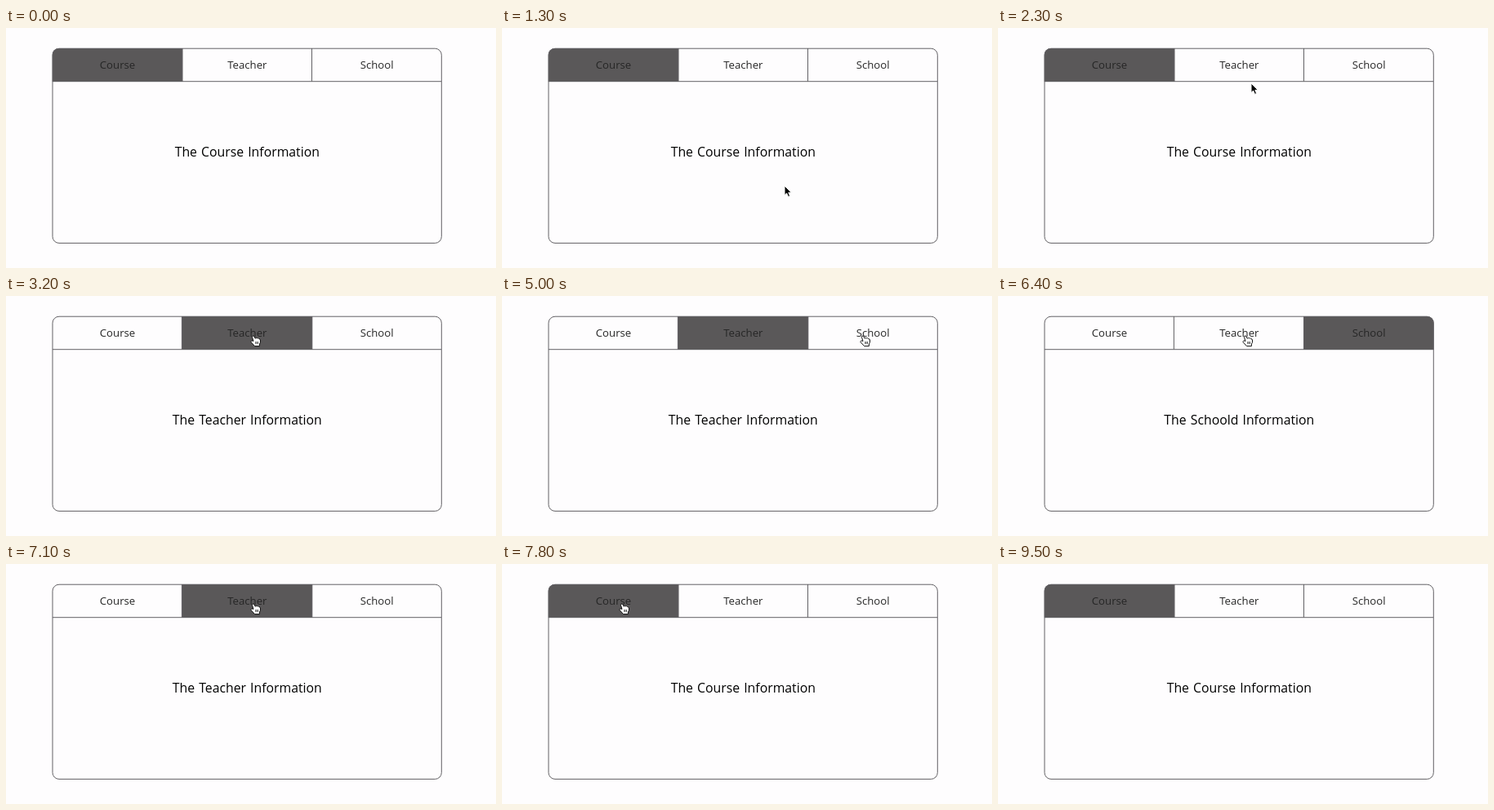
Recreate the animation shown at these times as an HTML page. Size 600x295 px, loop 10 s.

```html
<!DOCTYPE html>
<html lang="en">
<head>
<meta charset="utf-8">
<title>Tabs</title>
<style>
  html, body { margin: 0; width: 100%; height: 100%; overflow: hidden; background: #fefdfe; }
  svg { display: block; width: 600px; height: 295px; }
  text { font-family: "Open Sans", "Noto Sans", sans-serif; text-anchor: middle; }
  .tab { font-size: 13.2px; fill: #262626; }
  #info { font-size: 15.8px; word-spacing: 1px; fill: #000; }
  .line { fill: none; stroke: #626064; stroke-width: 1; }
</style>
</head>
<body>
<svg viewBox="0 0 600 295">
  <clipPath id="panel"><rect x="56.6" y="25" width="477" height="240" rx="8"/></clipPath>
  <g clip-path="url(#panel)"><rect id="active" y="25" width="160" height="41" fill="#5a5859"/></g>
  <path class="line" d="M57 65.7H533M215.4 25V65.7M374.5 25V65.7"/>
  <rect class="line" x="57" y="25.2" width="476.3" height="239.2" rx="8"/>
  <g id="labels"></g>
  <text id="info" x="295.3" y="158"></text>
  <g id="cursor" stroke-linejoin="round">
    <path id="arrow" stroke="#fff"
      d="M0 0V11.5L2.6 9.1L4.5 13.4L6.6 12.5L4.8 8.3H8.3Z"/>
    <path id="hand" fill="#fff" stroke="#111" transform="translate(-4)"
      d="M4 7.5L2.4 2.4Q2.6 .3 4.6 1.2L6.2 4.2Q7.2 2.6 8.4 4Q9.6 3 10.6 4.6Q12.6 4.4 12.6 7Q12.6 9.8 11.4 11V13.6H5.6L1 8.6Q1 6 4 7.5ZM7 8V11M9.2 8V11"/>
  </g>
</svg>
<script>
const el = id => document.getElementById(id);
const LOOP = 10000, STEP = 100, MOVE = 500;
const TAB_WIDTH = 158.8, HOVER_Y = 48;

const tabs = [
  { name: "Course", subject: "Course", hoverX: 147 },
  { name: "Teacher", subject: "Teacher", hoverX: 303 },
  { name: "School", subject: "Schoold", hoverX: 442 }
];
const hover = (leave, tab, click) => ({ leave, tab, click, x: tabs[tab].hoverX, y: HOVER_Y });

// The pointer leaves for each stop at a set time, and rests there until the next.
const entry = { x: 350, y: 300 };
const stops = [
  { leave: 0, x: 348, y: 245 },
  { leave: 1000, x: 345, y: 167 },
  hover(1930, 1, 3000),
  hover(4000, 2, 5300),
  hover(5900, 1, 6500),
  hover(7100, 0, 7700),
  { leave: 8800, x: 240, y: 300 }
];

el("labels").innerHTML = tabs.map((tab, i) =>
  `<text class="tab" x="${136.5 + TAB_WIDTH * i}" y="50.2">${tab.name}</text>`).join("");

function ease(u) {
  u = Math.min(1, Math.max(0, u));
  return u * u * (3 - 2 * u);
}

function pointerAt(t) {
  let { x, y } = entry;
  for (const stop of stops) {
    const e = ease((t - stop.leave) / MOVE);
    x += (stop.x - x) * e;
    y += (stop.y - y) * e;
  }
  return { x: Math.round(x), y: Math.round(y) };
}

function draw(now) {
  const t = Math.floor(now % LOOP / STEP) * STEP;
  const clicked = stops.filter(stop => stop.click <= t).pop();
  const selected = clicked ? clicked.tab : 0;
  el("active").setAttribute("x", 56.5 + TAB_WIDTH * selected);
  el("info").textContent = `The ${tabs[selected].subject} Information`;

  const { x, y } = pointerAt(t);
  const overTab = y < 66;
  el("cursor").setAttribute("transform", `translate(${x} ${y})`);
  el("hand").style.display = overTab ? "" : "none";
  el("arrow").style.display = overTab ? "none" : "";
}

const start = performance.now();
function frame() {
  draw(performance.now() - start);
  requestAnimationFrame(frame);
}
frame();
</script>
</body>
</html>
```
